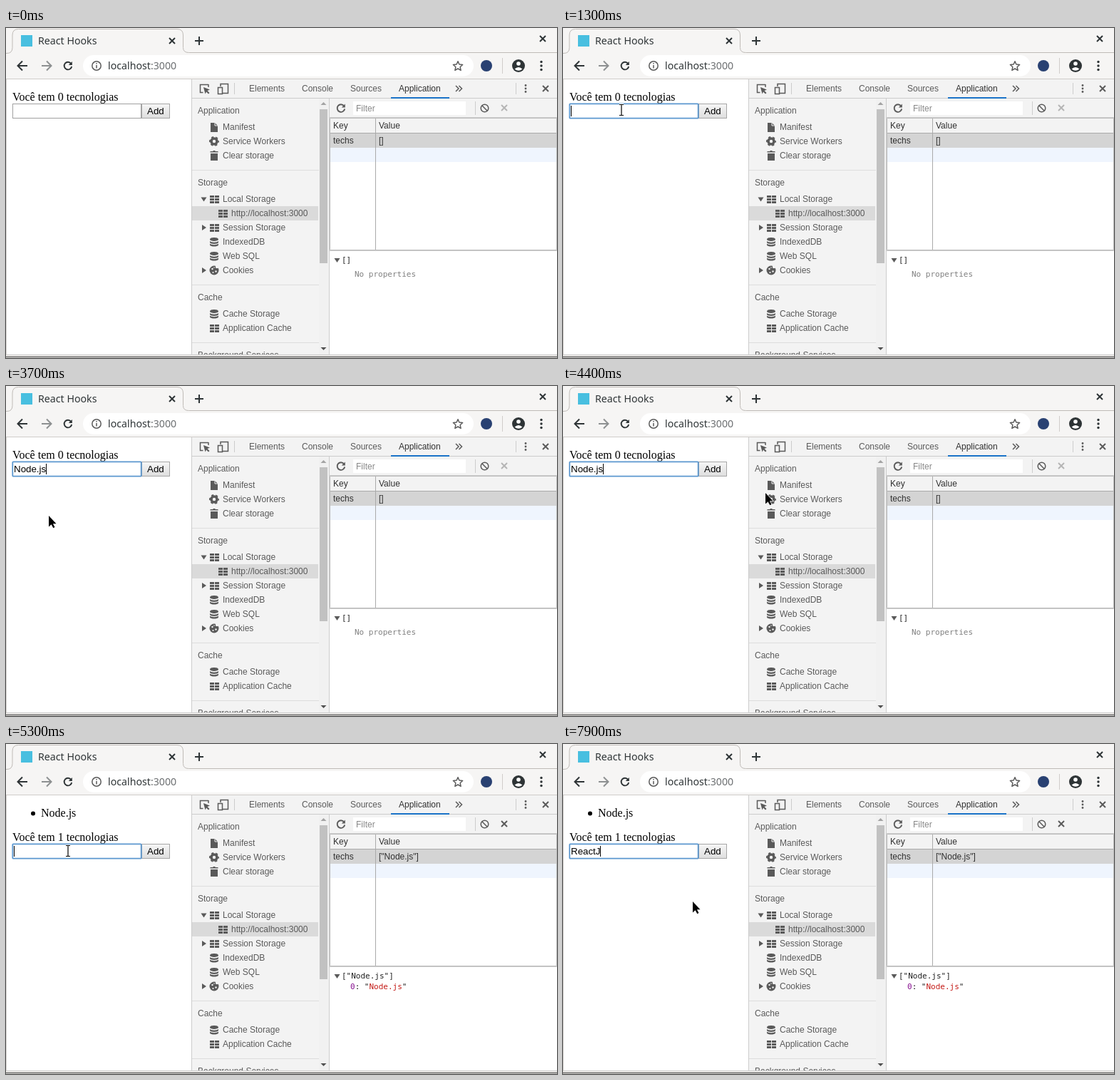
These frames come from a looping animation (773 by 463 pixels, 8000 ms). An HTML page:

```html
<!DOCTYPE html>
<html lang="en">
<head>
<meta charset="utf-8">
<title>Local storage demo</title>
<style>
  html, body { margin: 0; width: 100%; height: 100%; overflow: hidden; background: #fff }
  svg { display: block; width: 773px; height: 463px }
  text { white-space: pre }
  .ui { font: 14.2px "Noto Sans", "Open Sans", sans-serif; fill: #2e3436 }
  .dev { font: 12px "Liberation Sans", Arial, sans-serif; fill: #5a5a5a }
  .dark { fill: #303030 }
  .page { font: 16px "Liberation Serif", "Times New Roman", serif }
  .form { font: 13.333px "Liberation Sans", Arial, sans-serif }
  .mono { font: 11px "DejaVu Sans Mono", monospace; fill: #222 }
  .line { fill: none; stroke: #5a5a5a; stroke-width: 1.5 }
</style>
</head>
<body>
<svg viewBox="0 0 773 463">
  <defs>
    <linearGradient id="face" x2="0" y2="1"><stop stop-color="#f6f6f6"/><stop offset="1" stop-color="#dedede"/></linearGradient>
    <g id="table" fill="#5a5a5a"><path d="M0 0h6v3H0zM7 0h6v3H7zM0 4h6v3H0zM7 4h6v3H7zM0 8h6v3H0zM7 8h6v3H7z"/></g>
    <g id="disks" fill="#5a5a5a">
      <path d="M0 2.5C0-.8 12-.8 12 2.5S0 5.800 0 2.500zM0 5c2 2.200 10 2.200 12 0v2c-1 2.600-11 2.600-12 0zM0 8.500c2 2.200 10 2.200 12 0v2c-1 2.700-11 2.700-12 0z"/>
    </g>
    <path id="down" d="M0 0h8l-4 6z" fill="#5a5a5a"/>
    <path id="right" d="M0 0v8l6-4z" fill="#5a5a5a"/>
    <path id="cross" d="M-4-4 4 4M4-4-4 4" fill="none" stroke-width="2"/>
    <g id="reload" fill="none" stroke-width="1.900"><path d="M4.200-3.200A5.300 5.300 0 1 0 5.200 1"/><path d="M5.800-6v5h-5z" fill="currentColor" stroke="none"/></g>
  </defs>

  <!-- browser frame -->
  <path d="M0 0h773v72H0z" fill="#f6f5f4"/>
  <path d="M0 35.500h1q8 0 8-8V10q0-8.500 8.500-8.500H240q8.500 0 8.500 8.500v17.500q0 7 8 7H773" fill="none" stroke="#bfbbb7"/>
  <path d="M0 71.500h773" stroke="#cfccc9"/>
  <rect x="21" y="10" width="16" height="16" fill="#48bfe0"/>
  <text class="ui" x="45" y="23">React Hooks</text>
  <g stroke="#2e3436">
    <use href="#cross" x="233" y="18"/>
    <use href="#cross" x="753" y="15"/>
    <path d="M265 18h12M271 12v12" stroke-width="2"/>
    <path d="M30 53H17M23 46.500 16.500 53l6.500 6.500" fill="none" stroke-width="2"/>
    <path d="M50 53h13M57 46.500 63.500 53 57 59.500" fill="none" stroke="#8d9091" stroke-width="2"/>
    <use href="#reload" x="87" y="53" color="#2e3436"/>
  </g>
  <rect x="108" y="38" width="548" height="30" rx="15" fill="#fff"/>
  <circle cx="127" cy="53" r="6.200" class="line"/>
  <path d="M127 52v4.500M127 49v1.600" class="line"/>
  <text class="ui" x="143" y="58">localhost<tspan fill="#6d7072">:3000</tspan></text>
  <path d="m634 46.700 1.900 4.300 4.700.5-3.500 3.200 1 4.700-4.100-2.400-4.100 2.400 1-4.700-3.500-3.200 4.700-.5z" class="line" stroke-linejoin="round"/>
  <circle cx="674" cy="53" r="8" fill="#294172"/>
  <path d="M696.500 42v22" stroke="#d0cdca"/>
  <circle cx="719" cy="53" r="9" fill="#2e3436"/>
  <circle cx="719" cy="50" r="2.800" fill="#fff"/>
  <path d="M713.500 57.500q5.500-5 11 0-5.500 4.500-11 0" fill="#fff"/>
  <g fill="#2e3436"><circle cx="751" cy="47.500" r="1.700"/><circle cx="751" cy="53" r="1.700"/><circle cx="751" cy="58.500" r="1.700"/></g>

  <!-- devtools panels -->
  <path d="M261 72h512v27H261zM261 99h178v360H261zM454 99h319v49H454z" fill="#f3f3f3"/>
  <path d="M260.500 72v387M261 98.500h512M453.500 99v360M454 125.500h319" stroke="#ccc" fill="none"/>
  <path d="M540 97h82v2h-82z" fill="#1a73c8"/>
  <path d="M284 79.500h-11.500v11h4" class="line" stroke="#666" stroke-width="1.200"/>
  <path d="M284 79v4" class="line" stroke-width="1.200"/>
  <path d="m277 83 9 3.500-3.500 1.500 3 3-1.500 1.500-3-3-1.500 3z" fill="#5a5a5a"/>
  <path d="M301 82v-3.500h10.500v13H304M297.500 83.500h6v9h-6z" class="line" stroke-width="1.200"/>
  <path d="M320.500 77v16M658.500 103v19M715.500 77v16" stroke="#ccc"/>
  <g class="dev">
    <text x="341" y="89">Elements</text><text x="415" y="89">Console</text><text x="483" y="89">Sources</text>
    <text x="551" y="89" class="dark">Application</text>
  </g>
  <path d="m631 81 4 4-4 4M635.500 81l4 4-4 4" class="line"/>
  <g fill="#5a5a5a"><circle cx="729" cy="80.500" r="1.400"/><circle cx="729" cy="85" r="1.400"/><circle cx="729" cy="89.500" r="1.400"/></g>
  <use href="#cross" x="757" y="85" stroke="#5a5a5a"/>

  <!-- sidebar -->
  <path d="M261 250h177v20H261z" fill="#dadada"/>
  <path d="M261 199.500h178M261 360.500h178M261 441.500h178" stroke="#ddd"/>
  <g id="side" class="dev"></g>
  <path d="M287 133h6l4 4v9h-10z" fill="#5a5a5a"/><path d="M293 133v4h4" stroke="#f3f3f3" fill="none"/>
  <circle cx="292" cy="159" r="4" fill="none" stroke="#5a5a5a" stroke-width="3.600"/>
  <circle cx="292" cy="159" r="6" fill="none" stroke="#5a5a5a" stroke-width="2" stroke-dasharray="3.140" stroke-dashoffset="1.570"/>
  <path d="M286.500 173h3.500l1-1h2l1 1h3.500v1.500h-11zM287 176h10v10h-10z" fill="#5a5a5a"/>
  <use href="#table" x="286" y="235"/><use href="#table" x="298" y="255"/><use href="#table" x="286" y="275"/><use href="#table" x="286" y="416"/>
  <use href="#disks" x="286" y="294"/><use href="#disks" x="286" y="314"/><use href="#disks" x="286" y="395"/>
  <use href="#down" x="273.500" y="237.500"/><use href="#right" x="275" y="276"/><use href="#right" x="275" y="336"/>
  <circle cx="292" cy="340" r="6.500" fill="#5a5a5a"/>
  <g fill="#f3f3f3"><circle cx="289.500" cy="338" r="1.200"/><circle cx="290.500" cy="343" r="1.100"/><circle cx="294.500" cy="341.500" r="1.200"/><circle cx="296" cy="335" r="2.200"/><circle cx="292" cy="336" r=".8"/></g>
  <path d="M439 99h14v360h-14z" fill="#f1f1f1"/>
  <path d="M440 114h11v216h-11z" fill="#c1c1c1"/>
  <path d="m441.500 108 4-4 4 4z" fill="#a3a3a3"/><path d="m441.500 448 4 4 4-4z" fill="#505050"/>

  <!-- storage table -->
  <use href="#reload" x="470" y="112.500" stroke="#5a5a5a" color="#5a5a5a"/>
  <path d="M487 103h158v19H487z" fill="#fff"/>
  <text x="491" y="117" class="dev" style="fill:#888">Filter</text>
  <circle cx="671.500" cy="112.500" r="5.300" class="line" stroke-width="1.800"/><path d="m667.800 108.800 7.400 7.400" class="line" stroke-width="1.800"/>
  <use id="remove" href="#cross" x="699" y="112"/>
  <path d="M455 148h317v20H455z" fill="#d4d4d4"/>
  <path d="M455 168h317v20H455z" fill="#eff5fe"/>
  <path d="M454.500 126.500h318v185h-318z" fill="none" stroke="#bbb"/>
  <path d="M454 312.500h319" stroke="#ccc"/>
  <path d="M455 147.500h317M518.500 127v184" stroke="#aaa"/>
  <g class="dev dark">
    <text x="459" y="141">Key</text><text x="523" y="141">Value</text>
    <text x="459" y="162">techs</text><text x="523" y="162" id="value"></text>
  </g>
  <use href="#down" x="460.500" y="323"/>
  <text class="mono" x="471" y="329" id="preview"></text>
  <text class="mono" x="489" y="349" id="none" font-style="italic" style="fill:#808080">No properties</text>
  <text class="mono" x="483" y="344" id="entry"><tspan fill="#881391">0</tspan>: "<tspan fill="#c41a16">Node.js</tspan>"</text>

  <!-- page -->
  <g class="page" id="item"><circle cx="38" cy="97.500" r="3"/><text x="49" y="102">Node.js</text></g>
  <g id="panel">
    <text class="page" x="9" y="102" font-weight="bold" id="count"></text>
    <rect x="9.500" y="106.500" width="180" height="20" fill="#fff" stroke="#a0a0a0"/>
    <rect x="190.500" y="106.500" width="39" height="20" stroke="#a6a6a6" id="button"/>
    <text class="form" x="198" y="121">Add</text>
    <rect x="9.300" y="106.300" width="180.400" height="20.400" rx="1" fill="none" stroke="#5b97cf" stroke-width="1.800" id="ring"/>
    <text class="form" x="11" y="121" id="typed"></text>
    <path d="M.5 109v15" stroke="#000" id="caret"/>
  </g>

  <!-- window edges -->
  <path d="M0 459h773v4H0z" fill="#e4e2e0"/>
  <path d="M0 458.500h773" stroke="#d0d0d0"/>
  <path d="M0 461.500h773" stroke="#444"/>
  <path d="M.5 72v387" stroke="#d5d2cf"/>

  <path id="arrow" d="M0 0v15.500l3.600-3.300 2.700 5 2.200-1.100-2.600-4.900h4.600z" stroke="#fff" stroke-width="1.400" paint-order="stroke"/>
  <g id="beam" fill="none"><path d="M-3-7.500h6M-3 7.500h6M0-7v14" stroke="#fff" stroke-width="3"/><path d="M-3-7.500h2.500L0-7l.5-.5H3M-3 7.500h2.500L0 7l.5.5H3M0-7v14" stroke="#000" stroke-width="1.200"/></g>
</svg>
<script>
const $ = id => document.getElementById(id);
const show = (id, on) => $(id).style.display = on ? '' : 'none';
const at = (steps, t) => steps.findLast(s => s[0] <= t);

const sidebar = [
  [269, 120, 'Application'], [304, 143, 'Manifest'], [304, 163, 'Service Workers'], [304, 183, 'Clear storage'],
  [269, 221, 'Storage'], [304, 244, 'Local Storage'], [316, 264, 'http://localhost:3000'], [304, 284, 'Session Storage'],
  [304, 304, 'IndexedDB'], [304, 324, 'Web SQL'], [304, 344, 'Cookies'],
  [269, 382, 'Cache'], [304, 405, 'Cache Storage'], [304, 425, 'Application Cache'], [269, 463, 'Background Services']
];
$('side').innerHTML = sidebar.map(([x, y, s]) => `<text x="${x}" y="${y}">${s}</text>`).join('');

// time, x, y, shape
const pointer = [
  [0, 0, 0, ''], [700, 5, 200, 'arrow'], [800, 25, 182, 'arrow'], [900, 52, 152, 'arrow'], [1000, 76, 122, 'beam'],
  [1100, 82, 116, 'beam'], [1300, 82, 115, 'beam'], [1500, 80, 119, 'beam'], [1600, 74, 141, 'arrow'],
  [1700, 67, 162, 'arrow'], [1800, 62, 177, 'arrow'], [1900, 60, 182, 'arrow'], [4100, 190, 170, 'arrow'],
  [4200, 293, 162, 'arrow'], [4400, 284, 150, 'arrow'], [4500, 258, 128, 'arrow'], [4600, 234, 114, 'arrow'],
  [4700, 222, 110, 'arrow'], [5000, 150, 132, 'arrow'], [5100, 87, 150, 'beam'], [5500, 140, 190, 'arrow'],
  [5600, 182, 219, 'arrow'], [6000, 182, 221, 'arrow']
];
const typing = [
  [0, ''], [2700, 'N'], [3100, 'Nod'], [3400, 'Node.'], [3600, 'Node.j'], [3700, 'Node.js'], [4900, ''], [5900, 'R'],
  [6200, 'Re'], [6300, 'Rea'], [6500, 'Reac'], [6800, 'React'], [7500, 'React.'], [7700, 'React'], [7900, 'ReactJ']
];
const focus = [[0, false], [1300, true], [4800, false], [5300, true]];
const caret = [[0, false], [1300, true], [1800, false], [2700, true], [4800, false], [5300, true], [7400, false], [7500, true]];

function draw(now) {
  const t = now % 8000, added = t >= 4900, stored = t >= 5000;
  show('item', added);
  $('panel').setAttribute('transform', `translate(0 ${added ? 34 : 0})`);
  $('count').textContent = `Você tem ${+added} tecnologias`;
  $('button').setAttribute('fill', t >= 4800 && t < 4900 ? '#dcdcdc' : 'url(#face)');

  $('typed').textContent = at(typing, t)[1];
  const end = 11 + Math.floor($('typed').getComputedTextLength());
  $('caret').setAttribute('transform', `translate(${end} 0)`);
  show('caret', at(caret, t)[1]);
  show('ring', at(focus, t)[1]);

  $('value').textContent = $('preview').textContent = stored ? '["Node.js"]' : '[]';
  show('none', !stored);
  show('entry', stored);
  $('remove').setAttribute('stroke', stored ? '#5a5a5a' : '#b5b5b5');

  const [, x, y, shape] = at(pointer, t);
  for (const id of ['arrow', 'beam']) {
    show(id, id === shape);
    $(id).setAttribute('transform', `translate(${x} ${y})`);
  }
  requestAnimationFrame(draw);
}
requestAnimationFrame(draw);
</script>
</body>
</html>
```
